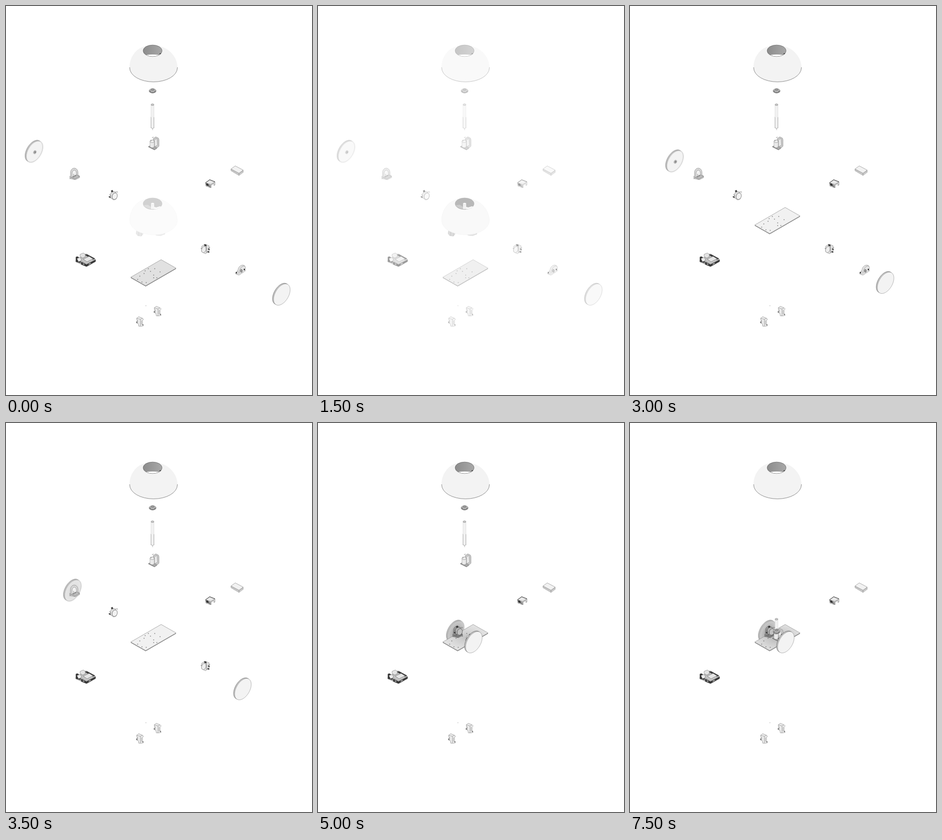
These frames come from a looping animation (574x730 px, 8 s). An HTML page:

```html
<!DOCTYPE html>
<html lang="en">
<head>
<meta charset="utf-8">
<title>Exploded robot assembly</title>
<style>
html, body { margin: 0; width: 100%; height: 100%; overflow: hidden; background: #fff; }
svg { display: block; width: 574px; height: 730px; }
.part { stroke: #666; stroke-width: .5; fill: #eee; stroke-linejoin: round; }
.dark { fill: #333; }
.mid { fill: #bbb; }
.none { fill: none; }
.bare { stroke: none; }

/* The picture advances in hard half-second steps. */
.step { animation: 8s step-end infinite; }
#exploded { animation-name: exploded; }
#assembled { animation-name: assembled; }
#plate { animation-name: plate; }
#wheelL { animation-name: wheelL; }
#armL { animation-name: armL; }
#motorL { animation-name: motorL; }
#wheelR { animation-name: wheelR; }
#armR { animation-name: armR; }
#motorR { animation-name: motorR; }
#lift { animation-name: lift; }
#hub { animation-name: hub; }
#shaft { animation-name: shaft; }
#shaftEnd { animation-name: shaftEnd; }
#wheelShade { animation-name: wheelShade; }
#plateShade { animation-name: plateShade; }
#plateTop { animation-name: plateTop; }

@keyframes exploded {
  0% { opacity: 1 } 6.25% { opacity: .4 } 12.5% { opacity: 0 }
  18.75% { opacity: .5 } 25%, 100% { opacity: 1 }
}
@keyframes assembled {
  0% { opacity: .32 } 6.25% { opacity: .88 } 12.5% { opacity: 1 }
  18.75% { opacity: .5 } 25%, 100% { opacity: 0 }
}
@keyframes plate {
  0% { transform: none } 25% { transform: translateY(-40px) }
  31.25%, 100% { transform: translateY(-98px) }
}
@keyframes wheelL {
  0% { transform: none } 37.5% { transform: translate(31px, 18px) }
  43.75% { transform: translate(72px, 41px) } 50% { transform: translate(109px, 63px) }
  56.25% { transform: translate(143px, 83px) } 62.5%, 100% { transform: translate(205px, 118px) }
}
@keyframes armL {
  0% { transform: none } 50% { transform: translate(37px, 22px) }
  56.25% { transform: translate(71px, 42px); filter: brightness(.85) }
  62.5%, 100% { transform: translate(133px, 77px); filter: brightness(.7) }
}
@keyframes motorL {
  0% { transform: none } 56.25% { transform: none; filter: brightness(.92) }
  62.5%, 100% { transform: translate(62px, 35px); filter: brightness(.8) }
}
@keyframes wheelR {
  0% { transform: none } 37.5% { transform: translate(-38px, -22px) }
  43.75% { transform: translate(-73px, -42px) } 50% { transform: translate(-109px, -63px) }
  56.25% { transform: translate(-137px, -79px) } 62.5%, 100% { transform: translate(-225px, -130px) }
}
@keyframes armR {
  0% { transform: none } 50% { transform: translate(-36px, -21px) }
  56.25% { transform: translate(-64px, -37px) } 62.5%, 100% { transform: translate(-152px, -88px) }
}
@keyframes motorR { 0% { transform: none } 62.5%, 100% { transform: translate(-88px, -51px) } }
@keyframes lift {
  0% { transform: none } 68.75% { transform: translateY(102px) }
  75%, 100% { transform: translateY(140px) }
}
@keyframes hub {
  0% { transform: none } 81.25% { transform: translateY(49px) }
  87.5% { transform: translateY(121px) } 93.75%, 100% { transform: translateY(232px) }
}
@keyframes shaft {
  0% { transform: none } 87.5% { transform: translateY(72px) }
  93.75%, 100% { transform: translateY(183px) }
}
@keyframes shaftEnd { 0% { opacity: 1 } 93.75%, 100% { opacity: 0 } }
@keyframes wheelShade {
  0% { opacity: 0 } 43.75% { opacity: .3 } 56.25% { opacity: .6 } 62.5%, 100% { opacity: 1 }
}
@keyframes plateShade { 0% { opacity: 0 } 62.5% { opacity: .75 } 75%, 100% { opacity: 1 } }
@keyframes plateTop { 0% { fill: #e1e1e1 } 25%, 100% { fill: #f1f1f1 } }
</style>
</head>
<body>
<svg viewBox="0 0 574 730">
  <defs>
    <linearGradient id="bore">
      <stop offset="0" stop-color="#8c8c8c"/><stop offset="1" stop-color="#a8a8a8"/>
    </linearGradient>
    <radialGradient id="shade">
      <stop offset="0" stop-color="#666" stop-opacity=".6"/>
      <stop offset="1" stop-color="#888" stop-opacity=".36"/>
    </radialGradient>
    <radialGradient id="floor">
      <stop offset="0" stop-color="#777" stop-opacity=".5"/>
      <stop offset="1" stop-color="#999" stop-opacity=".2"/>
    </radialGradient>
    <path id="domeBody" d="M232 116C232 97 243 81 258 77Q275 69 292 77C309 82 321 98 321.500 116A44.750 26.400 0 0 1 232 116Z"/>
    <ellipse id="disc" rx="22" ry="12.700" transform="rotate(-60)"/>
    <g id="wheel" stroke-width=".5">
      <use href="#disc" x="-2" y="-1.200" fill="#c8c8c8" stroke="#444"/>
      <use href="#disc" fill="#f3f3f3" stroke="#888"/>
    </g>
    <g id="foot">
      <path d="M245 586L249 583L256 586L258 588L256 590V598L258 600L254 601L249 601L248 596L245 595L246 591Z"/>
      <path class="none" d="M245 586L252 588L256 586M252 588V601M254 590V598M247 589V595"/>
      <path d="M244.500 592.500h1.500v2h-1.500zM256 597.500h1.500v1.500h-1.500z" fill="#777"/>
    </g>
  </defs>

  <g id="assembled" class="step">
    <g class="part">
      <path class="mid" d="M245 421h12v7l-3 4l-7 -1l-3 -4Z" stroke="#888"/>
      <path class="none" d="M249 424v7M254 424v7"/>
      <path d="M279 426L298 424V428L290 431L281 430Z" fill="#ccc" stroke="#888"/>
    </g>
    <g transform="translate(0 287)">
      <use href="#domeBody" fill="#f3f3f3" stroke="#e2e2e2" stroke-width=".5"/>
      <ellipse cx="275" cy="84" rx="17.800" ry="10.800" fill="#727272" stroke="#555" stroke-width=".5"/>
      <path d="M278 94.500V90L282 91L288 89L291 89Q287 94 278 94.500Z" fill="#f4f4f4"/>
      <path d="M258 87L266 86L272 90V94Q262 92 258 87Z" fill="#999"/>
      <path d="M272 84V94H278V84Z" fill="#e4e4e4"/>
      <ellipse cx="275" cy="84" rx="3" ry="1.800" fill="#fff" stroke="#999" stroke-width=".5"/>
    </g>
  </g>

  <g id="exploded" class="step">
    <g>
      <use href="#domeBody" fill="#f3f3f3" stroke="#eee" stroke-width=".5"/>
      <path d="M232 115V116A44.750 26.400 0 0 0 321.500 116V115" fill="none" stroke="#555" stroke-width=".6"/>
      <ellipse cx="275" cy="84" rx="17.800" ry="10.800" fill="url(#bore)" stroke="#444" stroke-width=".5"/>
      <path d="M263 92Q275 90 287 92Q275 97 263 92Z" fill="#fff"/>
      <path d="M288 89.500h2.500" stroke="#333" stroke-width="1.500"/>
    </g>

    <g class="part">
      <path d="M422 306L430 300L445 308L437 314Z" fill="#f2f2f2"/>
      <path d="M422 306V309L437 318L445 312V308.500L437 314Z" fill="#e4e4e4"/>
      <path class="none" d="M423 308L437 316L444 310.500M437 314V318" stroke="#777"/>
    </g>
    <g class="part" stroke="#333">
      <path d="M374 332L382 326L392 330L384 335Z" fill="#e8e8e8"/>
      <path d="M374 332L384 335L392 330V336L390 337V333L385 336V341L375 338Z" fill="#ddd"/>
      <path class="dark" d="M375 333h3l2 2v3l-4 -1Z"/>
      <path class="none" d="M381 335V340M383 336V341M374 332L382 326L392 330" stroke="#222" stroke-width=".8"/>
    </g>
    <g class="part" stroke="#222">
      <path d="M131 477L150 465L168 476V479.500L151 489L131 480Z" fill="#bbb"/>
      <path class="dark" d="M131 471L134 470L140 474V482L131 480ZM141 480L151 485L168 476V479.500L151 489L141 485Z"/>
      <path d="M133 474L138 472L141 474V478L136 480Z"/>
      <path d="M139 466L145 463.500L149 466V470L144 473L139 470Z" fill="#e4e4e4"/>
      <path class="dark" d="M148 467L152 466L167 474L163 476Z"/>
      <path d="M145 475L156 470L163 474.500L152 480Z" fill="#e6e6e6"/>
      <path class="none" d="M142 476L152 482L162 477M154 470L164 475" stroke="#eee"/>
      <path d="M144 483l3 1.500v1.500l-3 -1.500ZM155 484l4 -2v1.500l-4 2Z" fill="#ccc" stroke="none"/>
    </g>
    <g class="part" stroke="#999">
      <use href="#foot"/><use href="#foot" x="33" y="-19.500"/>
    </g>
    <circle cx="262.500" cy="562.500" r=".7" fill="#aaa"/>

    <g id="wheelL" class="step">
      <g transform="translate(53.500 273.300)" stroke-width=".5">
        <use href="#wheel"/>
        <ellipse rx="2.200" ry="3" cx="1" cy=".7" fill="#bbb" stroke="#555" transform="rotate(25)"/>
        <circle cx="1" cy="1" r="1" fill="#555"/>
        <use id="wheelShade" class="step" href="#disc" fill="url(#shade)"/>
      </g>
    </g>

    <g id="plate" class="step part">
      <path class="bare" d="M234 509V510.300L262 526.300L319 493.300V492L262 525Z" style="fill:#777"/>
      <path id="plateTop" class="step" d="M234 509L291 476L319 492L262 525Z"/>
      <path id="plateShade" class="step bare" d="M234 509L291 476L319 492L262 525Z" style="fill:url(#floor)"/>
      <path d="M251 507h0M259 502h0M261 497h0M267 493h0M271 498h0M279 493h0M289 499h0M277 505h0M283 510h0M277 510h0M247 513h0M255 518h0M263 519h0" stroke="#555" stroke-width="1.600" stroke-linecap="round"/>
    </g>

    <g id="armL" class="step part">
      <path d="M121 324V313C121 302 134 301 135 312V317L138 319V322L130 326Z" fill="#d8d8d8"/>
      <path d="M124 321V313C125 306 132 307 132 313V317Z" fill="#f2f2f2"/>
      <path class="mid" d="M122 322L133 317L138 320L129 325Z"/>
      <path class="none" d="M120 319V325M127 315V322M130 317V320" stroke="#333"/>
    </g>
    <g id="motorL" class="step part">
      <path d="M195 354L199 348L206 349L207 362L202 364L196 360Z" fill="#ddd"/>
      <ellipse cx="204" cy="357" rx="4.700" ry="6.300" transform="rotate(20 204 357)" fill="#f2f2f2" stroke="#333"/>
      <path class="dark" d="M197 346.500l3 -1l1 3l-3 1ZM193 357l3 1v2l-3 -1Z"/>
      <path class="none" d="M194 353L197 356L193 359M206 349l3 -1v3"/>
    </g>

    <g id="shaft" class="step part" stroke="#ddd">
      <g id="shaftEnd" class="step">
        <path class="bare" d="M272 208V229L275 231L277.500 229V208Z" fill="#f1f1f1"/>
        <path class="none" d="M272 208V229M277.500 208V229"/>
        <path class="none" d="M272 228.500L275 230L277.500 228.500M275 230V233" stroke="#777"/>
      </g>
      <path class="bare" d="M272 185V209H277.500V185Z" fill="#f1f1f1"/>
      <path class="none" d="M272 185V209M277.500 185V209" stroke="#ccc"/>
      <ellipse cx="274.800" cy="185.200" rx="2.700" ry="1.600" fill="#ccc" stroke="#666"/>
    </g>
    <g id="lift" class="step part">
      <path d="M276 249L281 245.500L286 248L287 251V263L281 269L276 266Z" fill="#c8c8c8" stroke="#777"/>
      <path d="M279 251L283 248.500L284 261L279 264Z" fill="#eee" stroke="#888"/>
      <path d="M267 264L272 261L283 266L279 270Z" fill="#aaa"/>
      <path d="M270 254V264Q274 268 278 264V254Z" fill="#eaeaea" stroke="#888"/>
      <ellipse cx="274" cy="254" rx="4" ry="2.300" fill="#f3f3f3"/>
      <path class="none" d="M274 247L277 246M272 251V254M267 264L279 270" stroke="#333"/>
    </g>
    <g id="hub" class="step part" stroke="#333">
      <ellipse cx="275" cy="159.600" rx="6.500" ry="3.800" fill="#777"/>
      <ellipse cx="275" cy="158.600" rx="6.300" ry="3.300" fill="#bbb"/>
      <ellipse cx="275" cy="156.800" rx="3" ry="2" fill="#999"/>
      <path class="none" d="M270 159.500h2M278 160h2" stroke-width="1.200"/>
    </g>

    <g id="motorR" class="step part">
      <path d="M367 451L373 447L381 450L381 460L374 465L367 461Z" fill="#e4e4e4"/>
      <ellipse cx="371" cy="457" rx="4" ry="6" transform="rotate(20 371 457)" fill="#eee"/>
      <path class="dark" d="M372 447l4 1v3l-4 -1ZM379 455l3 1v2l-3 -1ZM378 460l3 1v2l-3 -1Z"/>
      <path class="none" d="M365 455h3M376 451V463M380 454l3 -1M380 460l2 2" stroke="#333"/>
    </g>
    <g id="armR" class="step part">
      <path d="M431 501L435 496C436 486 447 483 449 490V497L437 505L431 503Z" fill="#e6e6e6"/>
      <path class="none" d="M435 497V503M438 502C437 492 443 487 448 488"/>
      <ellipse cx="441.500" cy="497" rx="2" ry="3" fill="#999"/>
      <path class="dark bare" d="M431 499h2v3h-2zM446 493h2v3h-2z"/>
    </g>
    <g id="wheelR" class="step">
      <use href="#wheel" x="517.500" y="541.500"/>
    </g>
  </g>
</svg>
</body>
</html>
```
